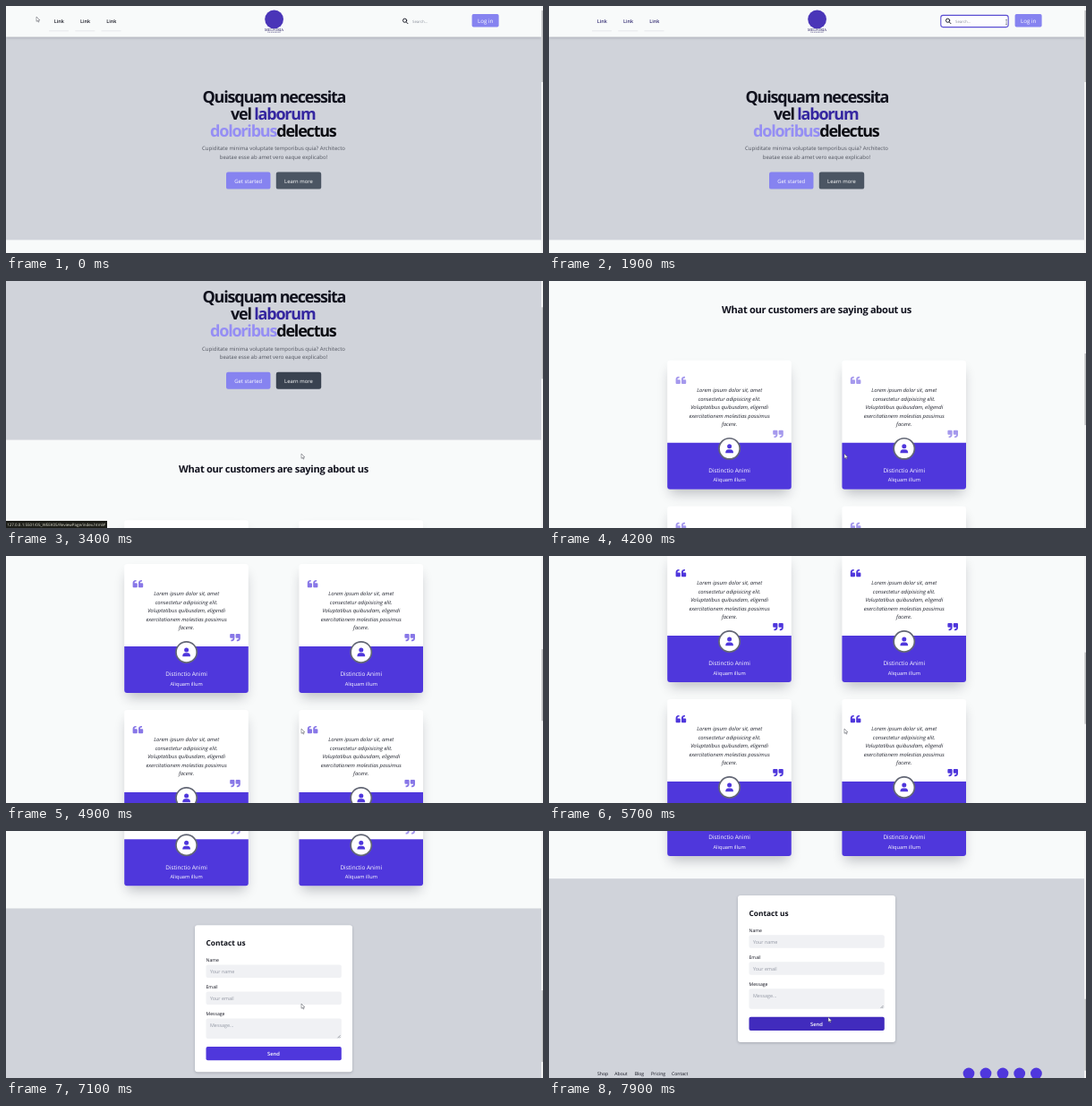
An HTML page that plays this animation: 600 by 276 pixels, repeating every 8000 ms.

```html
<!DOCTYPE html>
<html lang="en">
<head>
<meta charset="utf-8">
<title>Review page</title>
<style>
  html, body { margin: 0; width: 100%; height: 100%; overflow: hidden; background: #f8fafa; }
  svg { display: block; width: 100vw; height: 100vh; }
  text { font-family: "Open Sans", "Noto Sans", sans-serif; text-rendering: geometricPrecision; white-space: pre; }
  .blur { filter: blur(7px); }
  .soft { filter: drop-shadow(0 1px 1.5px rgba(20, 24, 40, .22)); }
</style>
</head>
<body>
<svg id="stage" viewBox="0 0 600 276"></svg>
<script>
const LOOP = 8000;
const INK = '#11121e', VISITED = '#2f2870', INDIGO = '#4f37dc', LILAC = '#8683f0';
const SLATE = '#4b5563', GRAY = '#d0d3da';
const stage = document.getElementById('stage');

const text = (x, y, size, str, attrs = '') =>
  `<text x="${x}" y="${y}" font-size="${size}" ${attrs}>${str}</text>`;
const rect = (x, y, w, h, fill, r = 0, attrs = '') =>
  `<rect x="${x}" y="${y}" width="${w}" height="${h}" rx="${r}" fill="${fill}" ${attrs}/>`;
const circle = (x, y, r, fill, attrs = '') =>
  `<circle cx="${x}" cy="${y}" r="${r}" fill="${fill}" ${attrs}/>`;
const MID = 'text-anchor="middle"';

function header() {
  const links = [53.8, 83.1, 112.3].map((x, i) =>
    text(x, 19, 5.4, 'Link', `id="link${i}" font-weight="600" fill="${INK}"`) +
    rect(x - 5.8, 27.6, 22, .6, '#d9dce1') +
    rect(x - 5.8, 27.4, 22, .9, INDIGO, 0, `id="line${i}"`)).join('');
  const serif = `${MID} style="font-family:'Noto Serif',serif" fill="#2c2466"`;
  return rect(0, 0, 598, 34.6, '#f8fafa', 0, 'class="soft"') + links +
    circle(299.6, 14.8, 10.4, '#4a35b8') +
    text(299.6, 28, 4, 'MELVORIA', serif) +
    text(299.6, 30.2, 1.9, 'CALM AND REST', serif) +
    rect(437.8, 10.4, 75.4, 13.2, '#fdfdff', 2.5, 'id="search" stroke="#5a4dd2" stroke-width="1.1"') +
    '<g fill="none" stroke="#20222e" stroke-linecap="round"><circle cx="445.6" cy="16.2" r="2.1"/><path d="M447.2 17.9l1.8 1.8"/></g>' +
    text(454, 18.8, 4.4, 'Search...', 'fill="#8b909c"') +
    rect(520.6, 9, 30, 14.6, LILAC, 1.8, 'id="login"') +
    text(535.7, 18.7, 6.2, 'Log in', `${MID} fill="#fff"`);
}

function hero() {
  const title = `font-weight="700" letter-spacing="-1.2" fill="${INK}"`;
  const sub = `${MID} fill="#51555f"`;
  return rect(0, 34, 598, 227.4, GRAY) +
    text(219.4, 108.2, 18, 'Quisquam necessita', title) +
    text(251, 127.1, 18, 'vel <tspan fill="#3527a0">laborum</tspan>', title) +
    text(228, 146, 18, '<tspan fill="#958ef4">doloribus</tspan><tspan fill="#0b0c12">delectus</tspan>', title) +
    text(299, 161.4, 6, 'Cupiditate minima voluptate temporibus quia? Architecto', sub) +
    text(299, 170.9, 6, 'beatae esse ab amet vero eaque explicabo!', sub) +
    rect(246, 185.6, 49.5, 19, LILAC, 2.2, 'id="start"') +
    text(270.7, 197.7, 5.95, 'Get started', `${MID} fill="#fff"`) +
    rect(301.8, 185.6, 50.4, 19, SLATE, 2.2, 'id="more"') +
    text(327, 197.7, 5.9, 'Learn more', `${MID} fill="#fff"`);
}

const QUOTE = '<path id="half" d="M1 0H4.2Q5.2 0 5.2 1V5Q5.2 8 2 8.2H1.2V6.6H2Q3.3 6.4 3.3 5V4.8H1Q0 4.8 0 3.8V1Q0 0 1 0Z"/>';
const quotes = (x, y, closing) =>
  `<g class="quote" fill="${INDIGO}" transform="translate(${x} ${y}) ${closing ? '' : 'translate(11.6 8.2) rotate(180)'}">` +
  '<use href="#half"/><use href="#half" x="6.4"/></g>';

function card(x, y) {
  const lines = ['Lorem ipsum dolor sit, amet', 'consectetur adipisicing elit.',
    'Voluptatibus quibusdam, eligendi', 'exercitationem molestias possimus', 'facere.'];
  const white = `${MID} fill="#fff"`;
  return `<g transform="translate(${x} ${y})">` +
    rect(3, 11, 132.6, 138, '#141828', 3, 'class="blur" opacity=".26"') +
    rect(0, 0, 138.6, 144, '#fff', 3) +
    `<path d="M0 92H138.6V141Q138.6 144 135.6 144H3Q0 144 0 141Z" fill="${INDIGO}"/>` +
    quotes(9.4, 18, false) + quotes(118, 78, true) +
    lines.map((s, i) => text(69.4, 35.5 + i * 9.5, 5.9, s, `${MID} font-style="italic" fill="#20232e"`)).join('') +
    circle(69.4, 98.5, 11.6, '#fff', 'stroke="#636775" stroke-width="1.7"') +
    circle(69.4, 96, 2.5, INDIGO) +
    `<path d="M65 103.3Q65 99.4 68.2 99.4H70.6Q73.8 99.4 73.8 103.3Z" fill="${INDIGO}"/>` +
    text(69.4, 125.3, 6.4, 'Distinctio Animi', white) +
    text(69.4, 135.6, 5.65, 'Aliquam illum', white) + '</g>';
}

function reviews() {
  return text(299, 298, 11.1, 'What our customers are saying about us',
      `${MID} font-weight="700" letter-spacing="-.3" fill="${INK}"`) +
    [351, 514].map(y => card(132.2, y) + card(327.4, y)).join('');
}

function contact() {
  const field = (y, h, label, hint) =>
    text(223.5, y - 3.2, 5.15, label, `fill="${INK}"`) +
    rect(223.5, y, 151.3, h, '#f0f1f4', 2) +
    text(228, y + 9.3, 5.4, hint, 'fill="#9297a3"');
  const nav = [[54, 'Shop'], [73.3, 'About'], [95.7, 'Blog'], [114, 'Pricing'], [137, 'Contact']];
  return rect(0, 683.2, 598, 240, GRAY) +
    rect(211, 702, 176, 164, '#fff', 3, 'class="soft"') +
    text(223.5, 724.6, 8.3, 'Contact us', 'font-weight="700" fill="#0d0f18"') +
    field(746.2, 14.6, 'Name', 'Your name') +
    field(776.2, 14.6, 'Email', 'Your email') +
    field(806.2, 22.6, 'Message', 'Message...') +
    '<path d="M370.5 828l3-3M372.3 828l1.2-1.2" stroke="#6b6f7a" stroke-width=".6"/>' +
    rect(223.5, 837.7, 151.3, 15.4, INDIGO, 2, 'id="send"') +
    text(299, 847.6, 5.8, 'Send', `${MID} font-weight="600" fill="#fff"`) +
    nav.map(([x, s]) => text(x, 903, 5.1, s, `fill="${INK}"`)).join('') +
    [469, 488, 507, 525.7, 544.4].map(x => circle(x, 901, 6.4, INDIGO)).join('');
}

const POINTERS = {
  arrow: '<path d="M0 0V5.3L1.3 4.2L2.1 6.1L3 5.7L2.2 3.9H3.9Z"/>',
  hand: '<path d="M-.5 0Q.5 -.5 .6 .5V2L3 2.5Q3.7 2.7 3.6 3.5L3 6H0L-1.9 3.6Q-1.7 2.8 -.6 3.6Z"/>',
  beam: '<path d="M-1 -2.6H1M0 -2.6V2.6M-1 2.6H1" fill="none"/>'
};

stage.innerHTML = `<defs>${QUOTE}</defs>` + rect(0, 0, 600, 276, '#f8fafa') +
  `<g id="page">${hero()}${header()}${reviews()}${contact()}</g>` +
  rect(598, 0, 2, 276, '#f3f3f4') + rect(598.4, 5, 1.6, 80, '#bfc0c2', 0, 'id="thumb"') +
  `<g id="status">${rect(0, 268, 113, 8, '#1c1d18')}${text(1.2, 273.8, 4.5,
    '127.0.0.1:5501/05_WEEK05/ReviewPage/index.html#', 'fill="#e4e4d4"')}</g>` +
  '<g id="pointer" stroke="#4a4c56" stroke-width=".5" fill="#fff">' +
  Object.entries(POINTERS).map(([k, p]) => `<g id="${k}">${p}</g>`).join('') + '</g>';

const $ = id => document.getElementById(id);
const quoteMarks = [...document.querySelectorAll('.quote')];

const clamp = v => Math.min(1, Math.max(0, v));

// Monotone cubic through [time, value] stops.
function track(stops) {
  const slope = i => (stops[i + 1][1] - stops[i][1]) / (stops[i + 1][0] - stops[i][0]);
  const tangent = i => {
    if (i === 0 || i === stops.length - 1) return 0;
    const a = slope(i - 1), b = slope(i);
    return a * b <= 0 ? 0 : 2 * a * b / (a + b);
  };
  return t => {
    if (t <= stops[0][0]) return stops[0][1];
    const i = stops.findIndex((s, k) => k < stops.length - 1 && t < stops[k + 1][0]);
    if (i < 0) return stops[stops.length - 1][1];
    const [t0, v0] = stops[i], [t1, v1] = stops[i + 1], d = t1 - t0, u = (t - t0) / d;
    return v0 + (v1 - v0) * u * u * (3 - 2 * u) +
      d * u * (1 - u) * ((1 - u) * tangent(i) - u * tangent(i + 1));
  };
}

const scroll = track([[3100, 0], [3400, 83.6], [3800, 186], [4200, 262], [4500, 306],
  [4900, 342], [5300, 354], [5700, 354], [6050, 400], [6400, 459], [6900, 560], [7400, 630]]);
const path = [[0, 34, 12], [100, 42, 15], [200, 57, 18], [350, 88, 18], [500, 117, 18],
  [650, 240, 18], [800, 440, 18], [900, 534, 17], [1050, 540, 16], [1250, 480, 15],
  [1500, 470, 17], [1700, 500, 18], [1900, 511, 18], [2050, 532, 17], [2250, 534, 18],
  [2500, 400, 120], [2700, 275, 195], [2850, 276, 196], [3000, 325, 196], [3100, 330, 193],
  [7450, 330, 193], [7750, 312, 208]];
const pointerX = track(path.map(p => [p[0], p[1]]));
const pointerY = track(path.map(p => [p[0], p[2]]));

// [start, end] of each hover, in ms
const hovers = {
  link0: [[150, 260]], link1: [[310, 400]], link2: [[450, 530]],
  login: [[870, 1110], [2000, 2290]], start: [[2650, 2900]], more: [[2930, 3700]], send: [[7650, 8000]]
};
const during = (t, spans) => spans.some(([a, b]) => t >= a && t < b);
const hover = (t, id) =>
  hovers[id].reduce((sum, [a, b]) => sum + clamp((t - a) / 120) - clamp((t - b) / 120), 0);

function mix(from, to, k) {
  const part = (hex, i) => parseInt(hex.slice(i, i + 2), 16);
  return `rgb(${[1, 3, 5].map(i => Math.round(part(from, i) + (part(to, i) - part(from, i)) * k))})`;
}

function draw(t) {
  const y = scroll(t);
  $('page').setAttribute('transform', `translate(0 ${-y})`);
  $('thumb').setAttribute('y', 5 + y * .29);

  for (const i of [0, 1, 2]) {
    const id = 'link' + i, k = hover(t, id);
    const rest = t < hovers[id][0][1] ? INK : VISITED;
    $(id).setAttribute('fill', mix(rest, INDIGO, k));
    $('line' + i).setAttribute('opacity', k);
  }
  const tint = (id, from, to) => $(id).setAttribute('fill', mix(from, to, hover(t, id)));
  tint('login', LILAC, '#5c4fe0');
  tint('start', LILAC, '#5c4fe0');
  tint('more', SLATE, '#394250');
  tint('send', INDIGO, '#412bbd');
  $('search').setAttribute('opacity', during(t, [[1500, 2150]]) ? 1 : 0);

  const pulse = .75 + .25 * Math.cos(2 * Math.PI * (t - 5800) / 3000);
  quoteMarks.forEach(q => q.setAttribute('opacity', pulse));

  const overLink = Object.keys(hovers).some(id => id !== 'send' && during(t, hovers[id]));
  $('status').setAttribute('opacity', overLink ? 1 : 0);

  const px = pointerX(t), py = pointerY(t);
  const inField = y === 0 && px > 437 && px < 514 && py < 24;
  const onButton = y === 0 && overLink;
  const shape = inField ? 'beam' : onButton ? 'hand' : 'arrow';
  for (const k in POINTERS) $(k).setAttribute('visibility', k === shape ? 'visible' : 'hidden');
  $('pointer').setAttribute('transform', `translate(${px} ${py})`);
}

const begin = performance.now();
function tick() {
  draw((performance.now() - begin) % LOOP);
  requestAnimationFrame(tick);
}
tick();
</script>
</body>
</html>
```
